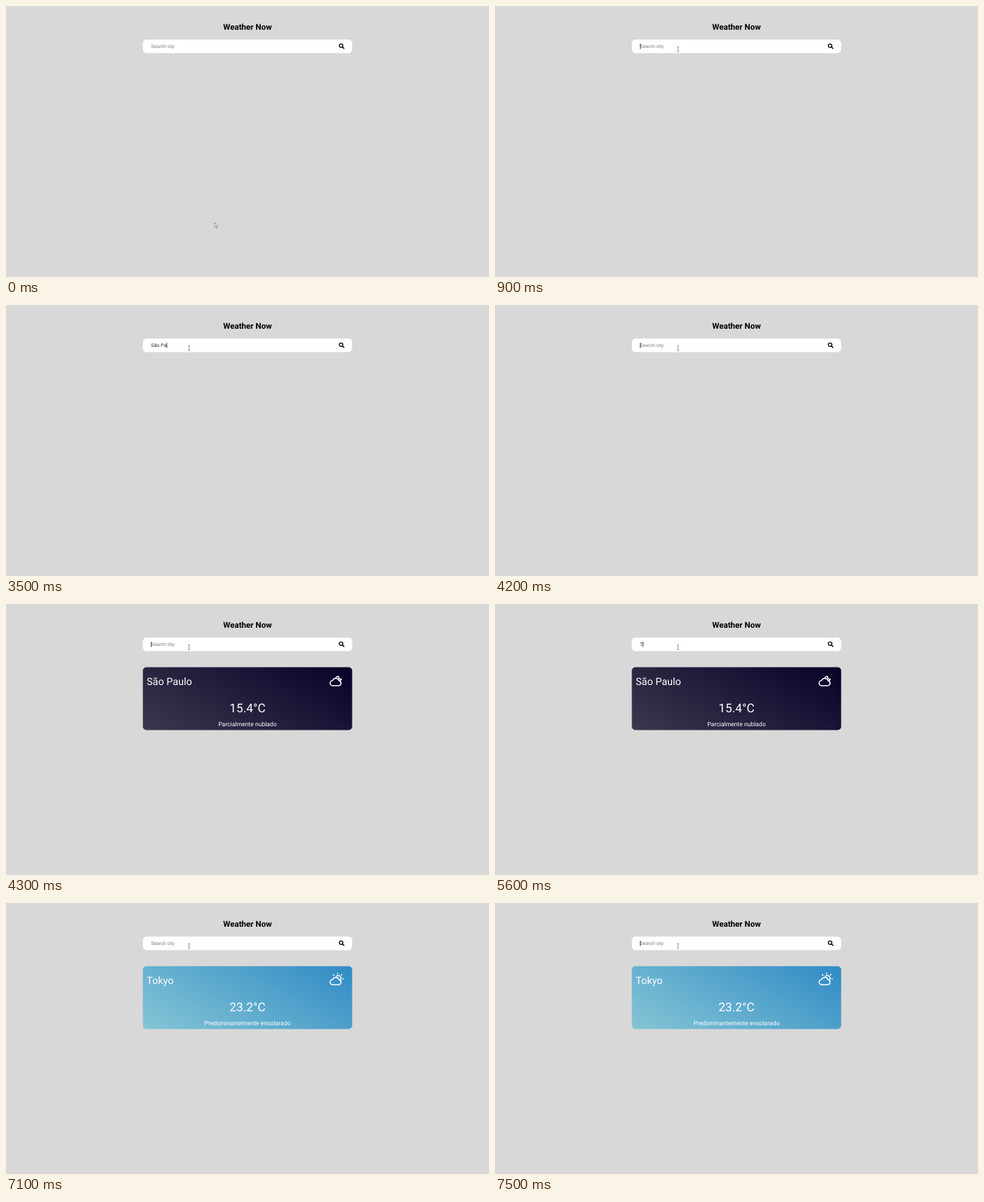
Recreate the animation shown at these times as an HTML page. Size 690x388 px, loop 8000 ms.

```html
<!DOCTYPE html>
<html lang="en">
<head>
<meta charset="utf-8">
<title>Weather search</title>
<style>
  html, body { margin: 0; width: 100%; height: 100%; overflow: hidden; background: #d8d8d8; }
  svg { display: block; width: 690px; height: 388px; }
  text { font-family: Roboto, sans-serif; text-rendering: geometricPrecision; white-space: pre; }
  .mid { text-anchor: middle; }
  .title { font-size: 11.6px; font-weight: 700; }
  .field { font-family: "Liberation Sans", Arial, sans-serif; font-size: 6.85px; }
  .card text { fill: #fff; }
  .city { font-size: 14.45px; }
  .temp { font-size: 17.3px; }
  .sky { font-size: 8.65px; }
  .icon { fill: none; stroke: #fff; stroke-width: 1.5; stroke-linecap: round; stroke-linejoin: round; }
</style>
</head>
<body>
<svg viewBox="0 0 690 388">
  <defs>
    <linearGradient id="night" gradientUnits="userSpaceOnUse" x1="288.2" y1="233.8" x2="401.8" y2="37.2">
      <stop offset="0" stop-color="#3a384e"/><stop offset="1" stop-color="#070229"/>
    </linearGradient>
    <linearGradient id="day" gradientUnits="userSpaceOnUse" x1="288.2" y1="233.8" x2="401.8" y2="37.2">
      <stop offset="0" stop-color="#85c5d5"/><stop offset="1" stop-color="#308bc5"/>
    </linearGradient>
    <path id="cloud" d="M467 117H475.2A3.6 3.6 0 0 0 475.9 109.9A5 5 0 0 0 466.6 109.4A3.8 3.8 0 0 0 467 117Z"/>
  </defs>
  <rect width="690" height="388" fill="#d8d8d8"/>
  <text class="title mid" x="345" y="33.8">Weather Now</text>

  <rect x="195.5" y="48" width="299" height="19.5" rx="5.5" fill="#fff"/>
  <g fill="none" stroke="#000">
    <circle cx="478.7" cy="56.8" r="2.5" stroke-width="1.3"/>
    <path d="M480.6 58.7L482.7 60.8" stroke-width="1.6" stroke-linecap="round"/>
  </g>
  <text class="field" id="hint" x="207" y="60" fill="#757575">Search city</text>
  <text class="field" id="typed" x="207" y="60" fill="#222"></text>
  <rect id="caret" y="54" width="0.75" height="7.6" fill="#111"/>

  <g class="card" id="nightCard">
    <rect x="195.5" y="90.5" width="299" height="90" rx="5" fill="url(#night)"/>
    <text class="city" x="201" y="116.4">São Paulo</text>
    <text class="temp mid" x="345" y="154.8">15.4°C</text>
    <text class="sky mid" x="345" y="175.4">Parcialmente nublado</text>
    <g class="icon">
      <use href="#cloud"/>
      <path d="M471 105.8A4.2 4.2 0 0 1 475 103.4A3.2 3.2 0 0 0 479 107.4A4 4 0 0 1 477.4 109.9"/>
    </g>
  </g>

  <g class="card" id="dayCard">
    <rect x="195.5" y="90.5" width="299" height="90" rx="5" fill="url(#day)"/>
    <text class="city" x="201" y="116.4">Tokyo</text>
    <text class="temp mid" x="345" y="154.8">23.2°C</text>
    <text class="sky mid" x="345" y="175.4">Predominantemente ensolarado</text>
    <g class="icon">
      <use href="#cloud"/>
      <path d="M472 104.9A4 4 0 0 1 477.9 110.2M473.6 100.4V101.6M467.6 102.6L468.4 103.4M479.8 102.3L479 103.1M481.2 108.4H482"/>
    </g>
  </g>

  <path id="arrow" d="M0 0V6.4L1.5 5.1L2.5 7.4L3.6 6.9L2.6 4.7H4.6Z" fill="#fff" stroke="#555" stroke-width="0.6"/>
  <path id="beam" d="M-1.3 -3.6H1.3M0 -3.6V3.6M-1.3 3.6H1.3" fill="none" stroke="#777" stroke-width="0.75"/>
</svg>
<script>
const LOOP = 8000, LEFT = 207;
const $ = id => document.getElementById(id);

// [time, field content]
const typing = [
  [0, ""], [2200, "S"], [2900, "Sã"], [3100, "São"], [3200, "São "],
  [3400, "São P"], [3500, "São Pa"], [3600, "São Pau"], [3800, "São Paul"],
  [4000, "São Paulo"], [4200, ""],
  [5600, "T"], [5800, "To"], [6000, "Tok"], [6200, "Toky"], [6400, "Tokyo"], [7100, ""]
];
// [time, caret shown]
const blink = [
  [0, 0], [900, 1], [1400, 0], [2000, 1], [2700, 0], [2900, 1],
  [4500, 0], [5100, 1], [7000, 0], [7500, 1]
];
// [time, pointer position]
const pointer = [
  [0, [298.3, 310.4]], [200, [308, 288]], [300, [322, 240]], [400, [325, 188]],
  [500, [312, 142]], [600, [292, 110]], [700, [271, 84]], [800, [261.5, 61.8]]
];

const at = (list, t) => list.filter(e => e[0] <= t).pop()[1];
const show = (el, on) => el.setAttribute("visibility", on ? "visible" : "hidden");

function draw(t) {
  const text = at(typing, t), typed = $("typed");
  if (typed.textContent !== text) typed.textContent = text;
  show($("hint"), !text);

  const end = text ? typed.getComputedTextLength() : 0;
  $("caret").setAttribute("x", LEFT + end);
  show($("caret"), at(blink, t));

  show($("nightCard"), t >= 4300 && t < 7100);
  show($("dayCard"), t >= 7100);

  const [x, y] = at(pointer, t), inField = y > 48 && y < 67;
  for (const id of ["arrow", "beam"]) $(id).setAttribute("transform", `translate(${x} ${y})`);
  show($("arrow"), !inField);
  show($("beam"), inField);
}

const start = performance.now();
function tick(now) {
  draw(Math.max(0, now - start) % LOOP);
  requestAnimationFrame(tick);
}
draw(0);
requestAnimationFrame(tick);
</script>
</body>
</html>
```
